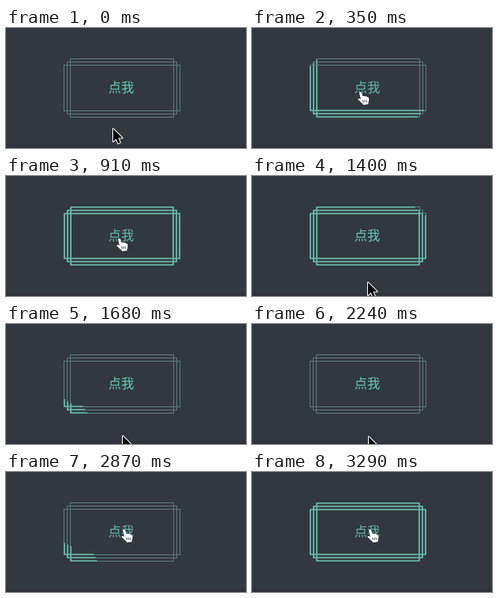
An HTML page with a canvas for the animation above (3.36 s loop, 300 px wide and 150 px high).

```html
<!DOCTYPE html>
<html lang="zh-CN">
<head>
<meta charset="utf-8">
<style>
html, body { margin: 0; width: 100%; height: 100%; overflow: hidden; background: #32383f; }
canvas { display: block; }
</style>
</head>
<body>
<canvas id="stage" width="300" height="150"></canvas>
<script>
const ctx = document.getElementById('stage').getContext('2d');
const LOOP = 3360, STEP = 70;
const TEAL = '#67bbae';

// Pointer hot spot: time, x, y
const pointer = [
  [0, 134, 126], [210, 135, 108], [350, 136, 80], [560, 138, 80],
  [910, 142, 78], [1120, 143, 88], [1330, 144, 109], [1400, 145, 133],
  [1680, 146, 140], [2240, 146, 141], [2450, 146, 140], [2800, 147, 112],
  [2870, 148, 72], [LOOP, 148, 72]
];

const arrow = new Path2D('M0 0V16L3.7 12.6L6.2 18.3L8.8 17.2L6.3 11.5H11.5Z');
const hand = new Path2D(
  'M-2 1.5C-2-.4.7-.6 1.3 1.2L2.5 5.2C3.4 4.3 4.9 4.6 5.3 5.6C6.4 4.9 7.6 5.3 7.9 6.4' +
  'C9.3 5.9 10.1 6.9 10.2 8.2C10.5 10.6 9.8 12.2 9.4 13.4L9.5 15.2L3 16.3L2.4 14.8' +
  'C.8 13.6-1.3 11.4-3.2 9.8C-4.3 8.5-2.8 7.3-1.4 8.2L-.1 9.1Z');

const lerp = (a, b, k) => a + (b - a) * k;
const clamp = v => Math.min(1, Math.max(0, v));
const bezier = (a, b, s) => 3 * a * s * (1 - s) ** 2 + 3 * b * s * s * (1 - s) + s ** 3;

// The CSS "ease" curve
function ease(t) {
  if (t <= 0 || t >= 1) return clamp(t);
  let lo = 0, hi = 1;
  for (let i = 0; i < 20; i++) {
    const mid = (lo + hi) / 2;
    if (bezier(.25, .25, mid) < t) lo = mid; else hi = mid;
  }
  return bezier(.1, 1, lo);
}

function progress(t) {
  if (t < 1385) return ease((t - 234) / 400);
  if (t < 2822) return 1 - ease((t - 1385) / 450);
  return ease((t - 2822) / 400);
}

function pointerAt(t) {
  const i = pointer.findIndex(p => p[0] > t);
  const [t0, x0, y0] = pointer[i - 1], [t1, x1, y1] = pointer[i];
  const k = (t - t0) / (t1 - t0);
  return [lerp(x0, x1, k), lerp(y0, y1, k)];
}

function line(...points) {
  ctx.beginPath();
  points.forEach(p => ctx.lineTo(...p));
  ctx.stroke();
}

// Left and bottom grow first, then top and right
function drawFrame(i, amount) {
  const x = 80 - 4 * i, y = 38 + 4 * i, w = 130 + 8 * i, h = 74 - 8 * i;
  ctx.strokeStyle = '#587d7d';
  ctx.lineWidth = 1;
  ctx.strokeRect(x + .5, y + .5, w - 1, h - 1);

  const first = clamp(amount * 2), second = clamp(amount * 2 - 1);
  const l = x + 1, t = y + 1, r = x + w - 1, b = y + h - 1;
  ctx.strokeStyle = TEAL;
  ctx.lineWidth = 1.7;
  if (first) line([l, lerp(b, t, first)], [l, b], [lerp(l, r, first), b]);
  if (second) {
    line([l, t], [lerp(l, r, second), t]);
    line([r, b], [r, lerp(b, t, second)]);
  }
}

function drawPointer(t, hover) {
  ctx.save();
  ctx.translate(...pointerAt(t));
  ctx.lineJoin = 'round';
  ctx.lineWidth = hover ? 1 : 2;
  ctx.strokeStyle = hover ? '#111' : '#fff';
  ctx.fillStyle = hover ? '#fff' : '#000';
  const shape = hover ? hand : arrow;
  ctx.stroke(shape);
  ctx.fill(shape);
  if (hover) {
    ctx.lineWidth = .7;
    for (const x of [2.6, 4.8, 7]) line([x, 10], [x + .4, 13]);
  }
  ctx.restore();
}

function draw(t) {
  const hover = t >= 234 && t < 1385 || t >= 2822;
  ctx.fillStyle = '#32383f';
  ctx.fillRect(0, 0, 300, 150);
  const edge = ctx.createLinearGradient(0, 145, 0, 150);
  edge.addColorStop(0, '#32383f');
  edge.addColorStop(1, '#302f3b');
  ctx.fillStyle = edge;
  ctx.fillRect(0, 145, 300, 5);

  for (let i = 0; i < 3; i++) drawFrame(i, progress(t));
  ctx.font = '16px "Noto Sans CJK SC", "Noto Sans CJK", sans-serif';
  ctx.textAlign = 'center';
  ctx.fillStyle = hover ? '#61bbae' : '#67cbbd';
  ctx.fillText('点我', 144, 80);
  drawPointer(t, hover);
}

const start = performance.now();
function tick() {
  const t = (performance.now() - start) % LOOP;
  draw(Math.floor(t / STEP) * STEP);
  requestAnimationFrame(tick);
}
tick();
</script>
</body>
</html>
```
